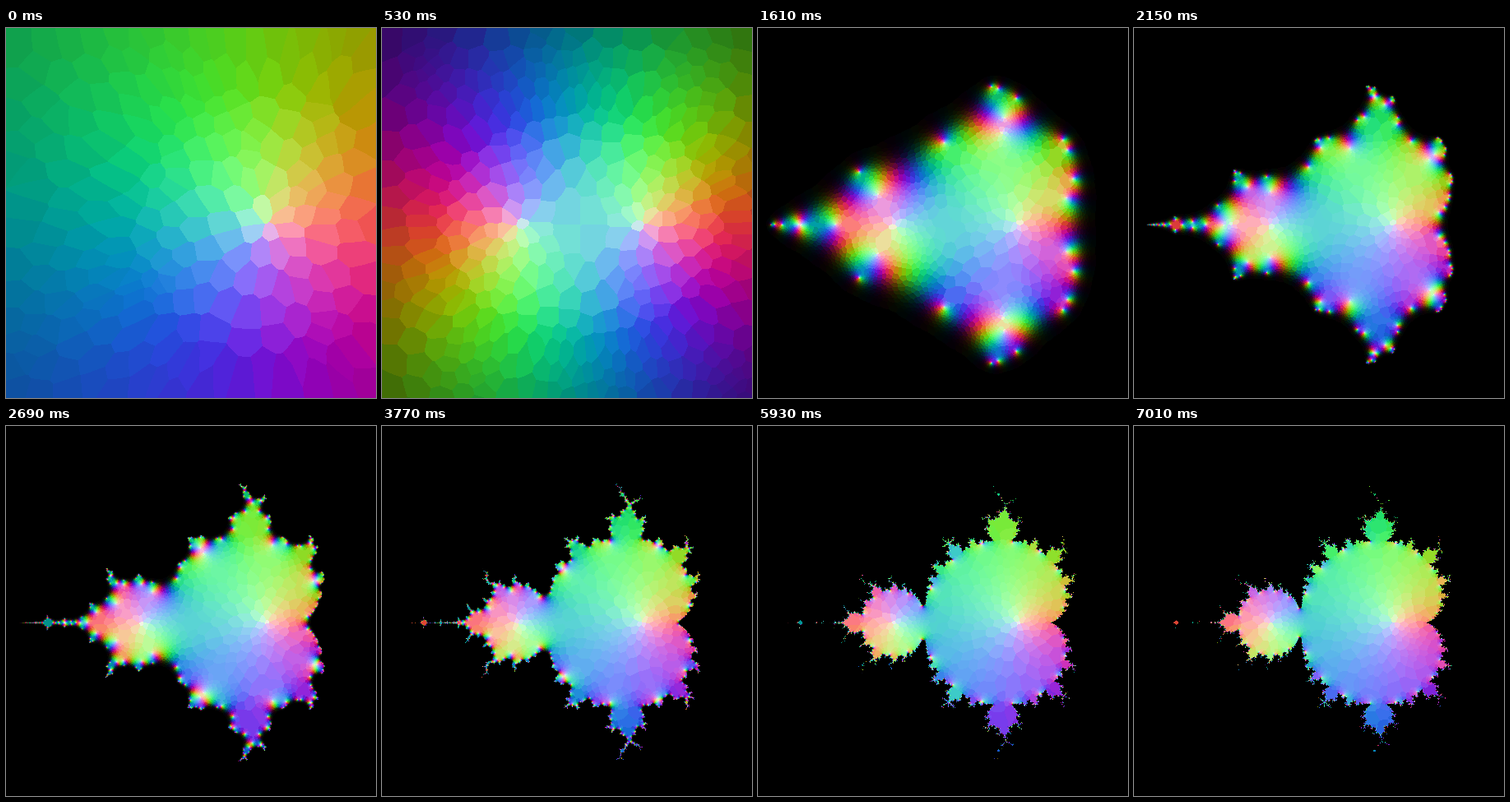
Animation of 450x450 px, one loop 7140 ms. Source, as an HTML page with a canvas:

```html
<!DOCTYPE html>
<html lang="en">
<head>
<meta charset="utf-8">
<title>Iterating z² + c</title>
<style>
  html, body { margin: 0; width: 100%; height: 100%; overflow: hidden; background: #000; }
  canvas { display: block; width: 100vw; height: 100vh; image-rendering: pixelated; }
</style>
</head>
<body>
<canvas id="stage" width="450" height="450"></canvas>
<script>
const SIZE = 450, SCALE = 150.6, CX = 316, CY = 238.7;
const LOOP = 7140, HOLD = 530, STEP = 270, STEPS = 26, COLORS = 256;

const ctx = document.getElementById('stage').getContext('2d');
const cache = [];

function seeded(seed) {
  return () => {
    seed = (Math.imul(seed, 1664525) + 1013904223) >>> 0;
    return seed / 4294967296;
  };
}

// Hue follows the argument; zero is white and infinity is black.
function paint(x, y, out, i) {
  const r = Math.hypot(x, y);
  const cos = r ? x / r : 1, sin = r ? y / r : 0;
  const gain = 1 / Math.sqrt(1 + 0.21 * r * r);
  const white = Math.max(0, 1 - Math.pow(r / 1.15, 0.4));
  const put = (k, wave) => {
    const v = gain * (0.5 + 0.5 * wave);
    out[i + k] = 255 * (v + white * (1 - v));
  };
  put(0, cos);
  put(1, -0.5 * cos + 0.866 * sin);
  put(2, -0.5 * cos - 0.866 * sin);
}

// Colours of z after n rounds of z -> z² + c.
function plane(n) {
  const out = new Float32Array(SIZE * SIZE * 3);
  for (let py = 0, i = 0; py < SIZE; py++) {
    const b = (CY - py) / SCALE;
    for (let px = 0; px < SIZE; px++, i += 3) {
      const a = (px - CX) / SCALE;
      let x = 0, y = 0;
      for (let k = 0; k < n && x * x + y * y < 1e10; k++) {
        const t = x * x - y * y + a;
        y = 2 * x * y + b;
        x = t;
      }
      if (x * x + y * y < 1e7) paint(x, y, out, i);
    }
  }
  return out;
}

// Nearest palette entry; entries are sorted by green so the scan can stop early.
function finder(colors) {
  colors.sort((p, q) => p[1] - q[1]);
  const n = colors.length;
  const R = Float32Array.from(colors, c => c[0]);
  const G = Float32Array.from(colors, c => c[1]);
  const B = Float32Array.from(colors, c => c[2]);
  const first = new Uint16Array(257);
  for (let g = 0, j = 0; g < 257; g++) {
    while (j < n && G[j] < g) j++;
    first[g] = j;
  }
  return (r, g, b) => {
    let best = 1e9, hit = 0;
    const mid = first[Math.min(256, g | 0)];
    for (let j = mid; j < n; j++) {
      const dg = G[j] - g;
      if (dg > 0 && dg * dg > best) break;
      const d = dg * dg + (R[j] - r) ** 2 + (B[j] - b) ** 2;
      if (d < best) { best = d; hit = j; }
    }
    for (let j = mid - 1; j >= 0; j--) {
      const dg = G[j] - g;
      if (dg < 0 && dg * dg > best) break;
      const d = dg * dg + (R[j] - r) ** 2 + (B[j] - b) ** 2;
      if (d < best) { best = d; hit = j; }
    }
    return hit;
  };
}

// A small palette gives the picture its mosaic cells.
function makePalette(rgb, seed) {
  const rand = seeded(seed), samples = [];
  for (let tries = 0; samples.length < 6000 && tries < 60000; tries++) {
    const i = 3 * Math.floor(rand() * SIZE * SIZE);
    if (rgb[i] + rgb[i + 1] + rgb[i + 2] > 10) {
      samples.push([rgb[i], rgb[i + 1], rgb[i + 2]]);
    }
  }
  let colors = samples.slice(0, COLORS - 1).map(c => c.slice());
  for (let round = 0; round < 5; round++) {
    const find = finder(colors);
    const sums = colors.map(() => [0, 0, 0, 0]);
    for (const [r, g, b] of samples) {
      const s = sums[find(r, g, b)];
      s[0] += r; s[1] += g; s[2] += b; s[3]++;
    }
    colors = colors.map((c, j) => {
      const s = sums[j];
      return s[3] ? [s[0] / s[3], s[1] / s[3], s[2] / s[3]] : c;
    });
  }
  colors.push([0, 0, 0]);
  return colors;
}

function build(step) {
  if (cache[step]) return cache[step];
  const rgb = plane(step + 1);
  const colors = makePalette(rgb, 71 + step);
  const find = finder(colors);
  const img = ctx.createImageData(SIZE, SIZE), px = img.data;
  for (let i = 0, o = 0; i < rgb.length; i += 3, o += 4) {
    px[o + 3] = 255;
    if (rgb[i] + rgb[i + 1] + rgb[i + 2] < 2) continue;
    const c = colors[find(rgb[i], rgb[i + 1], rgb[i + 2])];
    px[o] = c[0]; px[o + 1] = c[1]; px[o + 2] = c[2];
  }
  return cache[step] = img;
}

const start = performance.now();
let shown = -1;

function tick() {
  const t = (performance.now() - start) % LOOP;
  const step = t < HOLD ? 0 : Math.min(STEPS - 1, 1 + Math.floor((t - HOLD) / STEP));
  if (step !== shown) {
    ctx.putImageData(build(step), 0, 0);
    shown = step;
  } else {
    build((step + 1) % STEPS);
  }
  requestAnimationFrame(tick);
}
tick();
</script>
</body>
</html>
```
